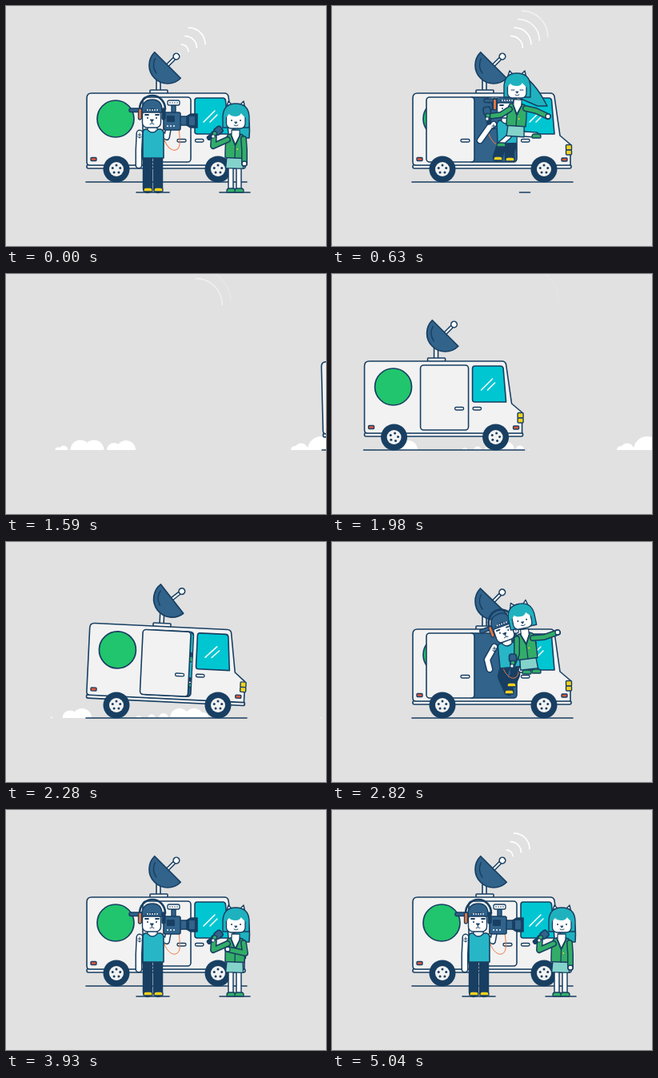
Recreate the animation shown at these times as an HTML page with a canvas. Size 400 by 300 pixels, loop 5.1 s.

```html
<!DOCTYPE html>
<html>
<head>
<meta charset="utf-8">
<style>
html, body { margin: 0; width: 100%; height: 100%; overflow: hidden; background: #e1e1e1; }
canvas { display: block; width: 400px; height: 300px; }
</style>
</head>
<body>
<canvas id="stage"></canvas>
<script>
const LOOP = 5100, TAU = Math.PI * 2, DEG = Math.PI / 180;
const INK = '#183f62', BLUE = '#31638b', CYAN = '#00c6d2', PALE = '#f2f2f2', WHITE = '#fff',
  SHIRT = '#27b6c6', HAIR = '#1fb2be', GREEN = '#32ad68', SKIRT = '#84d3cb',
  YELLOW = '#f6d21c', RED = '#e4573d', ORANGE = '#f0793f';

const canvas = document.getElementById('stage');
const dpr = window.devicePixelRatio || 1;
canvas.width = 400 * dpr;
canvas.height = 300 * dpr;
const c = canvas.getContext('2d');

// Drawing helpers
function paint(path, fill, line = 1.6, ink = INK) {
  if (fill) { c.fillStyle = fill; c.fill(path); }
  if (line) { c.strokeStyle = ink; c.lineWidth = line; c.stroke(path); }
}
const shape = (d, ...style) => paint(new Path2D(d), ...style);
function box(x, y, w, h, r, ...style) {
  const p = new Path2D();
  p.roundRect(x, y, w, h, r);
  paint(p, ...style);
}
function disc(x, y, r, ...style) {
  const p = new Path2D();
  p.arc(x, y, r, 0, TAU);
  paint(p, ...style);
}
function dots(x, y, n, step, r, fill) {
  for (let i = 0; i < n; i++) disc(x + i * step, y, r, fill, 0);
}
function limb(a, b, e, w, fill) {
  const d = `M${a[0]} ${a[1]}L${b[0]} ${b[1]}L${e[0]} ${e[1]}`;
  shape(d, null, w + 3, INK);
  shape(d, null, w, fill);
}
function at(x, y, turn, draw) {
  c.save();
  c.translate(x, y);
  c.rotate(turn);
  draw();
  c.restore();
}

// Motion helpers
const ease = k => k * k * (3 - 2 * k);
const mixList = (a, b, k) => a.map((v, i) => v + (b[i] - v) * k);
const mixPose = (a, b, k) =>
  Object.fromEntries(Object.keys(a).map(n => [n, mixList(a[n], b[n], k)]));
function track(t, keys, mix) {
  let i = 0;
  while (i < keys.length - 2 && t >= keys[i + 1][0]) i++;
  const [t0, a] = keys[i], [t1, b] = keys[i + 1];
  return mix(a, b, ease(Math.min(1, Math.max(0, (t - t0) / (t1 - t0)))));
}
const value = (t, ...keys) => track(t, keys, (a, b, k) => a + (b - a) * k);
const shift = (pose, dx, dy) => Object.fromEntries(Object.entries(pose).map(
  ([n, [x, y, ...rest]]) => [n, n === 'shadow' ? [x + dx, y] : [x + dx, y + dy, ...rest]]));

// Poses: joints in stage pixels, a third number is a turn in degrees
const girlStand = {
  neck: [287, 159], hip: [286, 190], head: [287, 142, 0], tail: [301, 165],
  elbowA: [259, 175], handA: [260, 160, 52], elbowB: [298, 180], handB: [298, 197],
  kneeA: [281, 215], footA: [281, 229], kneeB: [291, 215], footB: [291, 229], shadow: [286, 19]
};
const girlLean = {
  ...girlStand, neck: [289, 162], hip: [287, 194], head: [291, 145, 6],
  elbowB: [304, 174], handB: [313, 181]
};
const girlLeap = {
  neck: [232, 121], hip: [230, 150], head: [231, 104, 0], tail: [266, 125],
  elbowA: [211, 136], handA: [195, 138, -10], elbowB: [255, 131], handB: [270, 138],
  kneeA: [221, 163], footA: [211, 172], kneeB: [240, 160], footB: [255, 161], shadow: [241, 6.5]
};
const girlIn = { ...shift(girlLeap, -22, 18), shadow: [230, 0] };
const girlOut = {
  neck: [241, 113], hip: [245, 146], head: [237, 97, -12], tail: [233, 109],
  elbowA: [231, 140], handA: [226, 152, 0], elbowB: [265, 119], handB: [282, 113],
  kneeA: [236, 160], footA: [243, 161], kneeB: [252, 155], footB: [255, 160], shadow: [270, 0]
};
const girlFly = { ...shift(girlOut, 48, 18), shadow: [287, 8] };
const girlFold = { ...girlStand, elbowB: [299, 179], handB: [277, 174] };

const boyStand = {
  neck: [183, 154], hip: [183, 190], head: [182, 141, 0], elbow: [166, 180], hand: [166, 199],
  kneeA: [177, 210], footA: [177, 228], kneeB: [190, 210], footB: [190, 228],
  cam: [207, 144, 0], shadow: [183.5, 20.5]
};
const boyCrouch = {
  ...boyStand, neck: [185, 159], hip: [184, 195], head: [185, 146, 5], cam: [209, 149, 6]
};
const boyIn = {
  neck: [218, 143], hip: [219, 172], head: [218, 129, 0], elbow: [197, 151], hand: [185, 168],
  kneeA: [211, 177], footA: [207, 189], kneeB: [222, 181], footB: [222, 190],
  cam: [203, 140, -10], shadow: [200, 0]
};
const boyOut = {
  neck: [219, 126], hip: [222, 157], head: [215, 113, -20], elbow: [194, 147], hand: [197, 159],
  kneeA: [213, 168], footA: [221, 186], kneeB: [229, 166], footB: [224, 177],
  cam: [223, 134, 0], shadow: [195, 0]
};

const girlKeys = [[0, girlStand], [170, girlLean], [330, girlLean], [630, girlLeap],
  [740, girlIn], [2700, girlIn], [2820, girlOut], [2940, girlFly], [3110, shift(girlFold, 0, 2)],
  [3230, girlFold], [3960, girlFold], [4170, girlStand], [LOOP, girlStand]];
const boyKeys = [[0, boyStand], [130, boyCrouch], [390, boyIn], [2690, boyIn], [2820, boyOut],
  [2950, shift(boyStand, 0, -28)], [3080, boyCrouch], [3200, boyStand], [LOOP, boyStand]];

// Draws in the frame of a torso running from neck to hip
function torso({ neck: [x, y], hip }, draw) {
  const dx = hip[0] - x, dy = hip[1] - y;
  at(x, y, Math.atan2(-dx, dy), () => draw(Math.hypot(dx, dy)));
}
function shadow([x, half]) {
  if (half > 1) shape(`M${x - half} 233H${x + half}`, null, 1.6);
}
const shoe = ([x, y], fill) => box(x - 5, y - 1, 11, 5, [3, 3, 1, 1], fill, 1.3);

function girl(p, blink) {
  shadow(p.shadow);
  const [hx, hy, turn] = p.head, [tx, ty] = p.tail;
  shape(`M${hx + 3} ${hy - 18}Q${hx + 20} ${hy - 14} ${tx + 3} ${ty}L${tx - 9} ${ty}L${hx - 4} ${hy + 8}Z`, HAIR);
  const [px, py] = p.hip;
  limb([px - 5, py + 5], p.kneeA, p.footA, 4.5, WHITE);
  limb([px + 5, py + 5], p.kneeB, p.footB, 4.5, WHITE);
  shoe(p.footA, GREEN);
  shoe(p.footB, GREEN);
  torso(p, len => {
    shape(`M-10 ${len - 2}H10L11 ${len + 13}H-11Z`, SKIRT, 1.4);
    shape(`M-9 2Q0 -2 9 2Q13 4 12 ${len}H-12Q-13 4 -9 2Z`, GREEN, 1.5);
    shape('M-5 -4H5V3L0 14L-5 3Z', WHITE, 1.2);
    shape(`M-6 2L0 16L6 2M0 16V${len}`, null, 1.3);
    dots(3, 20, 2, 0, .8, YELLOW);
  });
  const [nx, ny] = p.neck;
  limb([nx + 10, ny + 7], p.elbowB, p.handB, 5, GREEN);
  disc(...p.handB, 3, WHITE, 1.3);
  at(hx, hy, turn * DEG, () => {
    shape('M-12 -14L-9 -23L-3 -17ZM12 -14L10 -23L4 -17Z', WHITE, 1.4);
    shape('M-16 10V-4Q-15 -20 0 -20Q16 -20 17 -4V10Z', HAIR, 1.4);
    box(-11.5, -9, 23.5, 20, 6, WHITE, 1.3);
    shape('M-13 -2Q-13 -18 0 -18Q13 -18 13 -2Q8 -6 7 -8Q5 -4 0 -4Q-6 -4 -8 -7Z', HAIR, 0);
    if (blink) shape('M-7 1H-3M4 1H8', null, 1);
    else dots(-5, 1, 2, 11, 1, INK);
    shape('M-1 3H2L.5 5Z', INK, .8);
    shape('M-2 7Q.5 9 3 7', null, .9);
  });
  limb([nx - 10, ny + 8], p.elbowA, p.handA, 5, GREEN);
  const [mx, my, spin] = p.handA;
  at(mx, my, spin * DEG, () => {
    box(-2.5, -3, 5, 13, 2, INK, 1.3);
    box(-4.5, -12, 9, 10, 3, BLUE, 1.6);
    disc(0, -1, 2.8, GREEN, 1.3);
  });
  disc(mx - 1, my + 3, 2.2, WHITE, 1);
}

function camera() {
  shape('M-10 5C-14 25 -2 38 5 36C13 34 10 20 9 9', null, 1, ORANGE);
  box(0, -20, 5, 10, 1, BLUE, 1.4);
  box(-5, -26, 15, 6, 2, WHITE, 1.3);
  dots(-2, -23, 4, 3, .8, INK);
  box(10, -6, 10, 11, 1, BLUE);
  shape('M19 -6L24 -9H32V8H24L19 5Z', INK);
  box(22, -6, 7, 11, 1, BLUE, 0);
  box(-10, -11, 21, 22, 2, BLUE);
  box(-6, -7, 10, 8, 1, INK, 0);
  dots(-5, 6, 3, 4, 1, WHITE);
}

function boy(p, blink) {
  shadow(p.shadow);
  const [px, py] = p.hip;
  limb([px - 6, py], p.kneeA, p.footA, 9.5, INK);
  limb([px + 7, py], p.kneeB, p.footB, 9.5, INK);
  shoe(p.footA, YELLOW);
  shoe(p.footB, YELLOW);
  const [nx, ny] = p.neck;
  const [cx, cy, spin] = p.cam;
  limb([nx + 11, ny + 6], [nx + 18, ny + 10], [cx - 4, cy + 9], 5, WHITE);
  at(cx, cy, spin * DEG, camera);
  torso(p, len => {
    shape(`M-9 0H10Q14 1 14 5V${len}H-12V5Q-12 1 -9 0Z`, SHIRT);
    shape('M-6 -4H6V1Q0 7 -6 1Z', WHITE, 1.3);
  });
  const arm = [nx - 16, ny + 5];
  limb(arm, p.elbow, p.hand, 6, WHITE);
  at(arm[0], arm[1] + 3, 0, () => shape('M0 -3V3M-2 -1H2M-2.5 1Q0 5 2.5 1', null, .9));
  at(p.head[0], p.head[1], p.head[2] * DEG, () => {
    box(-11.5, -11, 23, 22, 6, WHITE, 1.4);
    box(-28, -13, 17, 4.5, 2, BLUE, 1.4);
    shape('M-12 -8Q-13 -24 1 -24Q14 -24 13 -8Z', BLUE, 1.5);
    shape('M-8 -10Q1 -15 9 -10', INK, 1);
    dots(-5, -11, 5, 3, .9, WHITE);
    shape('M-15 -12A16 17 0 0 1 17 -12', null, 2.6);
    box(-16.5, -13, 4, 14, 2, ORANGE, 1.3);
    box(13, -13, 4, 14, 2, INK, 1.3);
    shape('M-8 -5H-4M5 -5H9', null, 1.8);
    if (blink) shape('M-7 -1H-3M4 -1H8', null, 1);
    else dots(-5, -1, 2, 11, 1, INK);
    shape('M-1.5 1H2.5L.5 3.5Z', INK, .9);
    shape('M.5 3V5.5M-2 6.5Q.5 5 3 6.5', null, .9);
  });
}

function dish(turn) {
  box(188, 92, 5, 14, 0, PALE);
  box(180, 105, 22, 4.5, 1, PALE);
  at(202, 74, (45 + turn) * DEG, () => {
    shape('M0 0V-11', null, 5);
    shape('M0 0V-11', null, 2, WHITE);
    shape('M-23 0A23 23 0 0 0 23 0Z', BLUE, 1.7);
    shape('M-17 5A18 18 0 0 0 -3 17', null, 1.4);
    disc(0, -15.5, 3.8, WHITE, 1.6);
  });
}

function wheel(x, spin) {
  disc(x, 204, 16.5, INK, 0);
  disc(x, 204, 9, PALE, 0);
  for (let i = 0; i < 5; i++) {
    const a = spin + i * TAU / 5 - TAU / 4;
    disc(x + 5 * Math.cos(a), 204 + 5 * Math.sin(a), 1.5, INK, 0);
  }
}

function van(t, riders) {
  const tilt = value(t, [1000, 0], [1180, -3], [1590, -1.4], [1700, 0], [2040, 0], [2230, 3.1],
    [2300, 2.7], [2450, -1], [2570, 0]);
  const wobble = value(t, [1050, 0], [1300, -6], [1700, 0], [2100, 0], [2270, 4.5], [2440, -6],
    [2600, 3], [2800, -1], [3000, 0]);
  const slide = value(t, [50, 0], [260, -53], [750, -53], [940, 0], [2215, 0], [2640, -53],
    [3220, -53], [3470, 0]);
  let dx = 0;
  if (t > 1050 && t < 1670) dx = 294 * ((t - 1050) / 540) ** 2;
  else if (t >= 1670 && t < 2220) dx = -320 * ((2220 - t) / 550) ** 2;
  c.save();
  c.translate(dx, 0);
  shape('M100 220H301', null, 1.6);
  c.save();
  const pivot = tilt > 0 ? 265 : 138;
  c.translate(pivot, 188);
  c.rotate(tilt * DEG);
  c.translate(-pivot, -188);
  dish(wobble);
  box(101, 198.5, 198, 4.5, 2, PALE);
  shape('M107 109H273Q277 109 278 113L285 162L298 173V199H105Q101 199 101 195V115Q101 109 107 109Z', PALE);
  disc(137, 141, 23, '#21c56d', 1.7);
  shape('M239 115H271Q274 115 274.5 118L278 160H239Q236 160 236 157V118Q236 115 239 115Z', CYAN);
  shape('M247 145L261 131M255 145L264 136', null, 1.5, WHITE);
  box(236.5, 166.5, 10.5, 3.5, 1.7, WHITE, 1.4);
  box(106, 189.5, 7, 4, 1, RED, 1.4);
  box(287, 190, 7, 4, 1, RED, 1.4);
  box(292.5, 173.5, 7, 6.5, 1, YELLOW, 1.4);
  box(292.5, 180, 7, 6, 1, YELLOW, 1.4);
  if (slide < 0) {
    c.save();
    box(171, 114, 60, 81, 4, BLUE);
    c.beginPath();
    c.rect(171.5, 114.5, 59, 80);
    c.clip();
    riders();
    c.restore();
  }
  box(171 + slide, 114, 60, 81, 4, PALE);
  box(214 + slide, 166.5, 11, 3.5, 1.7, WHITE, 1.4);
  c.restore();
  wheel(138, dx / 17);
  wheel(265, dx / 17);
  c.restore();
}

// Dust puffs: birth, x, radius
const PUFF_LIFE = 800;
const puffs = [[960, 150, 12], [970, 135, 9], [990, 110, 12.5], [1010, 93, 12.5], [1040, 72, 5.5],
  [1060, 65, 3.5], [1430, 361, 5], [1440, 369, 8.5], [1490, 394, 17], [1750, 57, 1.5],
  [1790, 80, 9.5], [1850, 95, 12], [1760, 166, 3], [1770, 182, 4.5], [1800, 197, 6],
  [1900, 217, 12], [1940, 235, 12], [1970, 246, 7]];
function dust(t) {
  for (const [birth, x, r] of puffs) {
    const age = t - birth;
    if (age < 0 || age > PUFF_LIFE) continue;
    const size = r * Math.min(1, age / 90, (PUFF_LIFE - age) / 160);
    const p = new Path2D();
    p.arc(x, 220, size, Math.PI, TAU);
    paint(p, WHITE, 0);
  }
}

function waves(t) {
  for (let i = 0; i < 4; i++) {
    const r = ((t - 4020 - i * 316 + LOOP * 2) % LOOP) * .019;
    if (r < .8 || r > 42) continue;
    const p = new Path2D();
    p.arc(213 + .75 * r, 63 - .75 * r, r, -TAU / 4, 0);
    c.globalAlpha = Math.min(1, (42 - r) / 20);
    paint(p, null, 1.7, WHITE);
    c.globalAlpha = 1;
  }
}

function frame() {
  const t = performance.now() % LOOP;
  c.setTransform(dpr, 0, 0, dpr, 0, 0);
  c.lineCap = c.lineJoin = 'round';
  c.fillStyle = '#e1e1e1';
  c.fillRect(0, 0, 400, 300);
  const drawBoy = () => boy(track(t, boyKeys, mixPose), t > 4400 && t < 4490);
  const drawGirl = () => girl(track(t, girlKeys, mixPose), (t > 480 && t < 740) || (t > 4620 && t < 4710));
  const boyInside = t > 330 && t < 2740, girlInside = t > 690 && t < 2740;
  waves(t);
  dust(t);
  van(t, () => {
    if (boyInside) drawBoy();
    if (girlInside) drawGirl();
  });
  if (!boyInside) drawBoy();
  if (!girlInside) drawGirl();
  requestAnimationFrame(frame);
}
frame();
</script>
</body>
</html>
```
